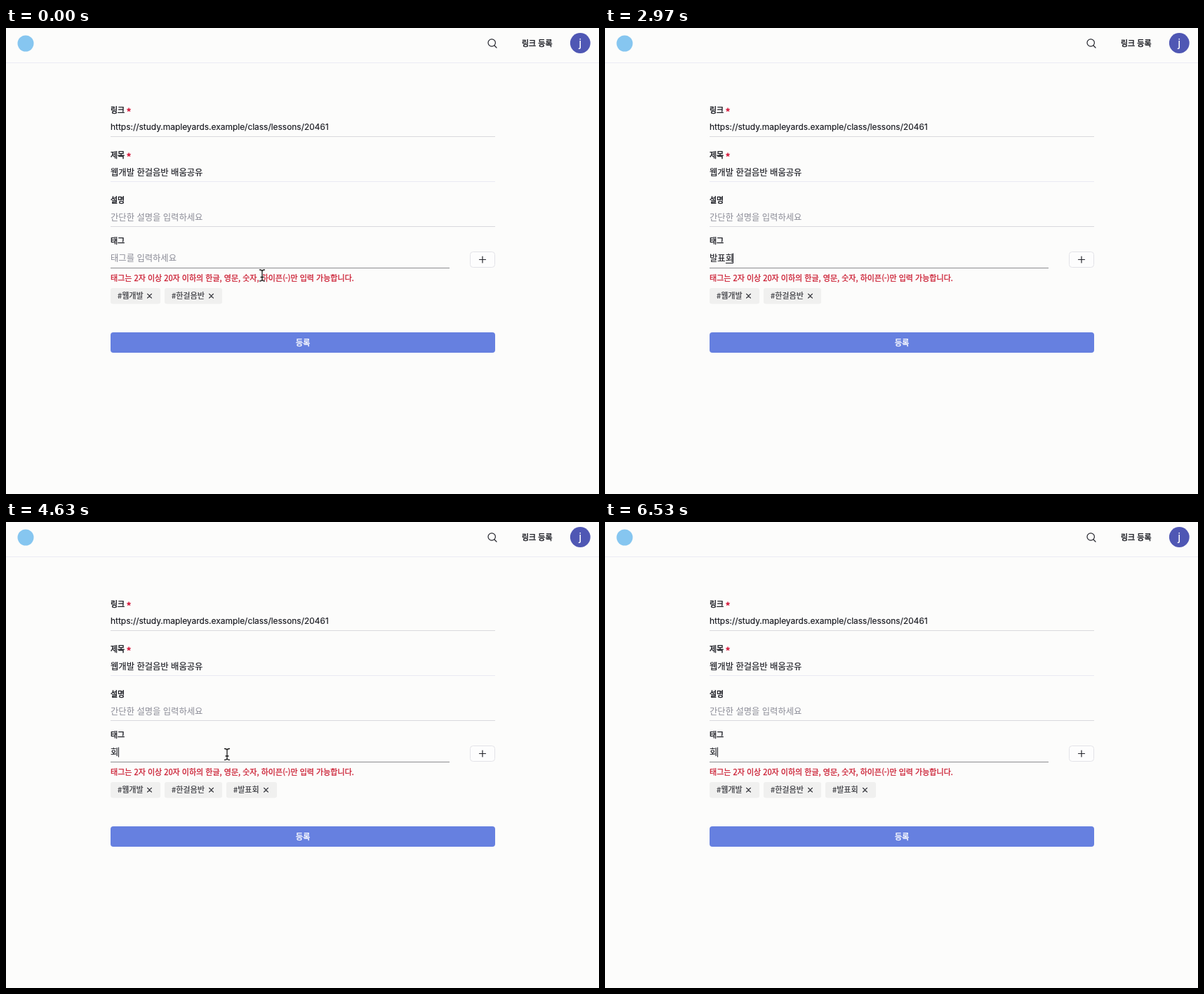
Write an HTML page that moves like this. It is 845 px wide and 663 px high and loops after 6.66 s.

```html
<!DOCTYPE html>
<html lang="ko">
<head>
<meta charset="utf-8">
<title>링크 등록</title>
<style>
  html, body { margin: 0; width: 100%; height: 100%; overflow: hidden; background: #fcfcfb; }
  svg { display: block; width: 845px; height: 663px; }
  text {
    font-family: "Noto Sans CJK KR", "Noto Sans KR", sans-serif; white-space: pre;
    color: #17181f; fill: currentColor; stroke: currentColor; stroke-width: .15;
  }
  .label { font-size: 11px; stroke-width: .4; }
  .star { font-size: 14px; font-weight: 700; color: #d4183a; }
  .value { font-size: 12.3px; }
  .url { font: 11.95px Inter, sans-serif; }
  .hint { color: #8a8b96; stroke-width: 0; }
  .error { font-size: 11.04px; color: #c9152b; stroke-width: .25; }
  .tag text { font-size: 11.1px; color: #2c2d33; }
  .tag rect { fill: #f0f0ef; }
  .icon { fill: none; stroke: #24252c; stroke-width: 1.2; stroke-linecap: round; }
  .avatar { font: 17px Roboto, sans-serif; color: #fff; stroke-width: 0; }
  .white { color: #fff; }
</style>
</head>
<body>
<svg viewBox="0 0 845 663">
  <circle cx="28" cy="22" r="11.5" fill="#86c6f0"/>
  <g class="icon"><circle cx="692.2" cy="21" r="5.2"/><path d="M696 25l3 3"/></g>
  <text class="label" x="735" y="25.6">링크 등록</text>
  <circle cx="818.3" cy="21.5" r="14.4" fill="#4f57b4"/>
  <text class="avatar" x="818.3" y="27" text-anchor="middle">j</text>
  <path d="M0 49.5H845" stroke="#ebebf4"/>

  <text class="label" x="149" y="121">링크</text><text class="star" x="171.6" y="125.2">*</text>
  <text class="url" x="149" y="145.4">https://study.mapleyards.example/class/lessons/20461</text>
  <text class="label" x="149" y="185">제목</text><text class="star" x="171.6" y="189.2">*</text>
  <text class="value" x="149" y="209.5">웹개발 한걸음반 배움공유</text>
  <text class="label" x="149" y="249">설명</text>
  <text class="value hint" x="149" y="273.5">간단한 설명을 입력하세요</text>
  <text class="label" x="149" y="307.4">태그</text>
  <path d="M149 154.5H697M149 282.5H697" stroke="#d9d9dd"/>
  <path d="M149 218.5H697" stroke="#eaeaf3"/>
  <path d="M149 341.5H632" stroke="#8b8c8f"/>

  <text class="value hint" id="hint" x="149" y="332">태그를 입력하세요</text>
  <text class="value" id="typed" x="149" y="332"></text>
  <path id="under" d="M.3 334.5h10.8" stroke="#1b1c24"/>
  <path id="caret" d="M0 320.5v14" stroke="#1b1c24"/>

  <rect x="661.5" y="318.5" width="35" height="22" rx="4" fill="#fdfdfd" stroke="#e3e3e8"/>
  <path class="icon" d="M674.5 329.5h9M679 325v9"/>

  <text class="error" x="149" y="360.2">태그는 2자 이상 20자 이하의 한글, 영문, 숫자, 하이픈(-)만 입력 가능합니다.</text>
  <g id="tags"></g>

  <rect x="149" y="433" width="548" height="29" rx="4" fill="#6680e0"/>
  <text class="label white" x="423.2" y="452" text-anchor="middle">등록</text>

  <g id="beam" fill="none" stroke-linecap="round">
    <path d="M-3.5-8Q0-8 0-5.5Q0-8 3.5-8M0-5.5V5.5M-3.5 8Q0 8 0 5.5Q0 8 3.5 8M-2 2.5H2" stroke="#fff" stroke-width="2.6"/>
    <path d="M-3.5-8Q0-8 0-5.5Q0-8 3.5-8M0-5.5V5.5M-3.5 8Q0 8 0 5.5Q0 8 3.5 8M-2 2.5H2" stroke="#1a1a1a" stroke-width="1.3"/>
  </g>
  <path id="arrow" d="M0 0V14.5L3.3 11.5L6 17.6L8.7 16.4L6 10.6H10.3Z" fill="#111" stroke="#fff" stroke-width="1.1"
        style="filter:drop-shadow(0 1px 1px #0006)"/>
</svg>
<script>
const LOOP = 6660, LEFT = 149, STEP = 12.3 * 0.92;
const $ = id => document.getElementById(id);

// [time, text, composing]
const typing = [
  [0, '', false], [1170, 'ㅂ', true], [1300, '바', true], [1570, '발', true],
  [1830, '발ㅍ', true], [1900, '발표', true], [2300, '발표ㅎ', true],
  [2570, '발표호', true], [2830, '발표회', true], [3330, '회', false]
];
const ENTER = 3330;

// [time, opacity to reach, fade length]
const blinks = [
  [0, 0, 0], [170, 1, 100], [700, 0, 100], [1170, 1, 0], [3330, 1, 0],
  [3830, 0, 100], [4350, 1, 100], [4870, 0, 100], [5390, 1, 100],
  [5900, 0, 100], [6430, 1, 100]
];

// [time, x, y]
const route = [
  [4400, 365, 352], [4600, 315, 330.5], [4930, 315, 330.5],
  [5470, 570, 274], [5630, 640, 225], [5980, 862, 70]
];

const last = (table, t) => table.findLastIndex(row => row[0] <= t);
const show = (el, on) => el.setAttribute('visibility', on ? 'visible' : 'hidden');
const move = (el, x, y = 0) => el.setAttribute('transform', `translate(${x.toFixed(2)} ${y.toFixed(2)})`);

function addTag(x, width, name) {
  const cross = x + width - 15.5;
  $('tags').insertAdjacentHTML('beforeend', `<g class="tag">
    <rect x="${x}" y="370" width="${width}" height="22.5" rx="3"/>
    <text x="${x + 10}" y="385.3">#${name}</text>
    <path class="icon" d="M${cross - 2.9} 378.3l5.8 5.8m0-5.8l-5.8 5.8"/></g>`);
  return $('tags').lastElementChild;
}
addTag(149, 71, '웹개발');
addTag(226, 82, '한걸음반');
const newTag = addTag(314, 72, '발표회');

function caretOpacity(t) {
  const i = last(blinks, t), [start, goal, length] = blinks[i];
  const from = i ? blinks[i - 1][1] : 0;
  const k = length ? Math.min(1, (t - start) / length) : 1;
  return from + (goal - from) * k;
}

function pointer(t) {
  if (t < 1170) return [365, 352];
  const i = last(route, t);
  if (i < 0 || i === route.length - 1) return null;
  const [t0, x0, y0] = route[i], [t1, x1, y1] = route[i + 1];
  const k = (t - t0) / (t1 - t0);
  return [x0 + (x1 - x0) * k, y0 + (y1 - y0) * k];
}

function draw(t) {
  const [, text, composing] = typing[last(typing, t)];
  const end = LEFT + STEP * text.length;
  if ($('typed').textContent !== text) $('typed').textContent = text;
  show($('hint'), !text);
  show($('under'), composing);
  move($('under'), end - STEP);
  move($('caret'), Math.floor(end) + 0.5);
  $('caret').setAttribute('opacity', caretOpacity(t).toFixed(3));
  show(newTag, t >= ENTER);

  const spot = pointer(t), overText = spot && spot[1] > 313;
  show($('beam'), spot && overText);
  show($('arrow'), spot && !overText);
  if (spot) move(overText ? $('beam') : $('arrow'), ...spot);
}

const began = performance.now();
function tick() {
  draw((performance.now() - began) % LOOP);
  requestAnimationFrame(tick);
}
tick();
</script>
</body>
</html>
```
